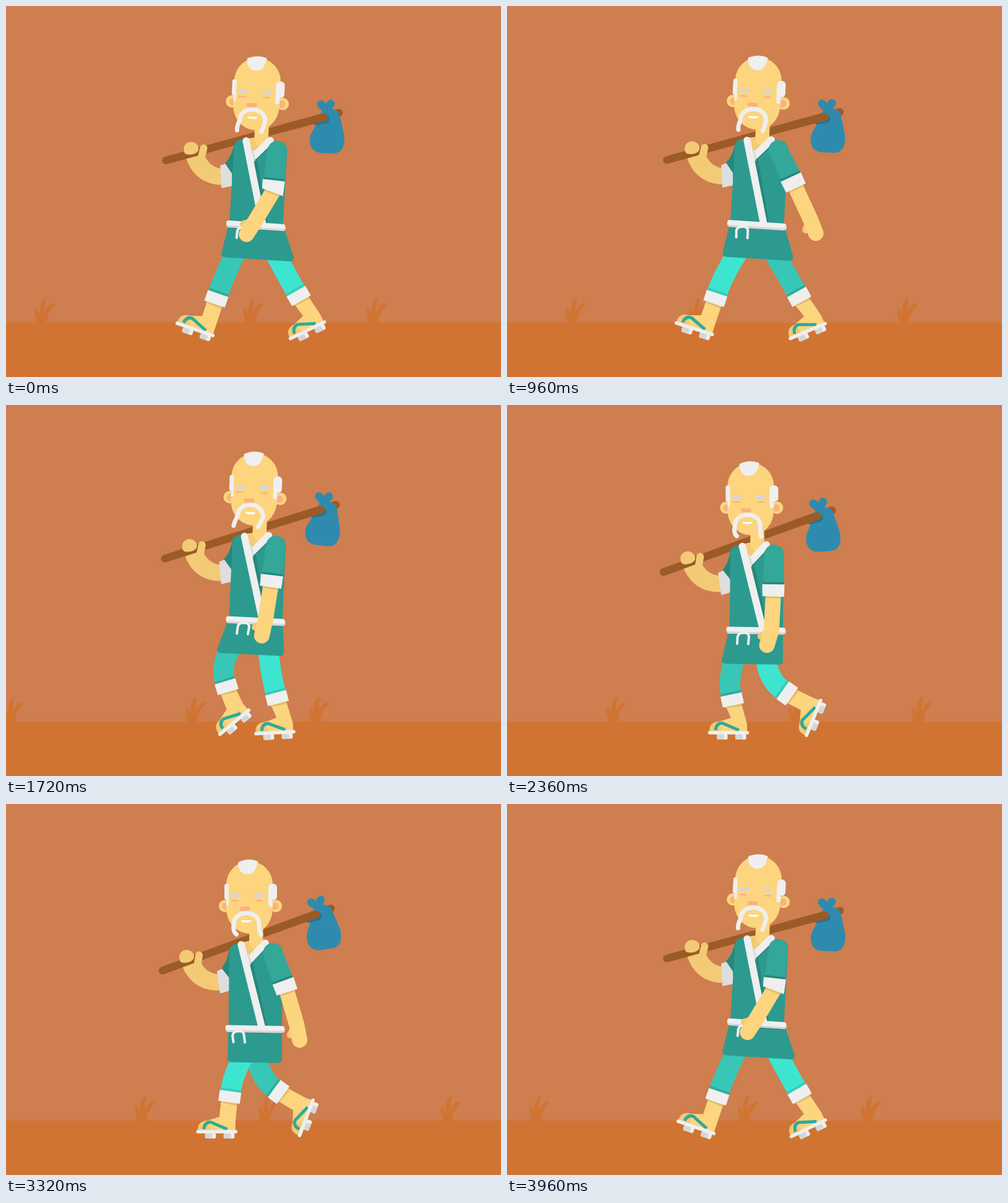
An HTML page with a canvas that plays this animation: 800x600 px, repeating every 4000 ms.

```html
<!DOCTYPE html>
<html lang="en">
<head>
<meta charset="utf-8">
<title>Old traveller walking</title>
<style>
html, body { margin: 0; width: 100%; height: 100%; overflow: hidden; background: #ce7e4f; }
canvas { display: block; }
</style>
</head>
<body>
<canvas id="stage" width="800" height="600"></canvas>
<script>
const ctx = document.getElementById('stage').getContext('2d');
const LOOP = 4000, STEP = 40, CYCLE = 1980, WORLD = 1030;
const RAD = Math.PI / 180;

const SKY = '#ce7e4f', GROUND = '#d17433';
const SKIN = '#fcd57e', SKIN_DARK = '#f3ca75', SKIN_SHADE = '#e3bd6b', BLUSH = '#fbb27c';
const WHITE = '#efefef', GREY = '#d6d6d6';
const TEAL = '#2d9a8f', TEAL_DARK = '#27877c', SLEEVE = '#33a798', STRAP = '#2eaa9b';
const WOOD = '#9b5b27', BAG = '#2e8bae', BAG_DARK = '#23759a';

// ---------- motion ----------

// Cyclic monotone cubic through rows of [time, ...values].
function track(...keys) {
  const n = keys.length;
  const get = (k, c) => keys[(k + n) % n][c] + (c ? 0 : CYCLE * Math.floor(k / n));
  return t => {
    let i = n - 1;
    while (i > 0 && keys[i][0] > t) i--;
    const t0 = get(i, 0), span = get(i + 1, 0) - t0, u = (t - t0) / span;
    return keys[0].slice(1).map((_, j) => {
      const c = j + 1;
      const slope = k => (get(k + 1, c) - get(k, c)) / (get(k + 1, 0) - get(k, 0));
      const tangent = k => {
        const a = slope(k - 1), b = slope(k);
        return a * b > 0 ? 2 * a * b / (a + b) : 0;
      };
      const s = u * u * (3 - 2 * u);
      return get(i, c) * (1 - s) + get(i + 1, c) * s +
        span * u * (1 - u) * ((1 - u) * tangent(i) - u * tangent(i + 1));
    });
  };
}

// x, lean, carrying arm turn
const bodyTrack = track(
  [0, 1.3, 2.85, 2], [380, 0, .1, 0], [640, 0, 1.2, .2],
  [990, 1.3, 2.85, 2], [1320, 0, 0, 0], [1720, .8, 1.9, .9]);
const bobTrack = track(
  [0, -9], [300, 1.5], [380, .5], [640, -15], [690, -15.8], [860, -12.5],
  [990, -9], [1270, .8], [1320, 0], [1670, -15.8], [1720, -15]);
// upper arm, forearm, hand: degrees from straight down
const armTrack = track(
  [0, -6.5, -31, -33], [380, -.8, -3, -17], [640, 12.7, 11.6, -2],
  [990, 25, 25, 22], [1320, 20.7, 17, 12], [1720, -7, -9, -13]);
// left hem, right hem, belt knot, moustache, bag turn
const clothTrack = track(
  [0, 349, 466, 7, -8, 0], [380, 347, 446, 6.5, -1.5, -6.5], [640, 359, 446, 1, -10, 2],
  [990, 349, 464, 4, -7, 0], [1320, 358, 446, 0, 0, -11], [1720, 342, 450, 8, -10.5, 4]);
// hip x, cuff x, cuff y, cuff turn, foot x, foot y, foot turn
const farLegTrack = track(
  [0, 380, 340, 473.5, 19, 305.5, 523, 19], [150, 377, 347, 477, 7, 321, 530, 0],
  [380, 378, 364, 477, -12, 358, 530, 0], [640, 400, 417, 474, -19, 415, 530, 0],
  [990, 420, 473, 470, -30, 487, 525, -26], [1320, 407, 443.5, 466, -54, 486, 507.5, -69.5],
  [1720, 378, 356.5, 455.5, -17, 369, 513, -40]);
const nearLegTrack = track(
  [0, 425, 473, 469, -30, 487, 524.5, -26], [380, 418, 453, 466.5, -55, 495.5, 506, -68],
  [640, 395, 390, 455.5, -27, 416, 511, -53], [990, 385, 336, 474, 19, 301, 523, 19],
  [1140, 387, 342, 477, 15, 311, 530, 0], [1320, 395, 359, 473.5, 9, 337, 530, 0],
  [1720, 422, 438, 474, -15, 434.5, 530, -3]);

// ---------- drawing helpers ----------

function fill(color, d) {
  ctx.fillStyle = color;
  ctx.fill(new Path2D(d));
}

function line(color, width, d, cap = 'round') {
  ctx.strokeStyle = color;
  ctx.lineWidth = width;
  ctx.lineCap = cap;
  ctx.lineJoin = 'round';
  ctx.stroke(new Path2D(d));
}

function dot(color, x, y, r) {
  ctx.fillStyle = color;
  ctx.beginPath();
  ctx.arc(x, y, r, 0, 7);
  ctx.fill();
}

function box(color, x, y, w, h, r) {
  ctx.fillStyle = color;
  ctx.beginPath();
  ctx.roundRect(x, y, w, h, r);
  ctx.fill();
}

function placed(x, y, deg, draw) {
  ctx.save();
  ctx.translate(x, y);
  ctx.rotate(deg * RAD);
  draw();
  ctx.restore();
}

function around(x, y, deg, draw) {
  placed(x, y, deg, () => { ctx.translate(-x, -y); draw(); });
}

function at(x, y, deg, px, py) {
  const c = Math.cos(deg * RAD), s = Math.sin(deg * RAD);
  return [x + px * c - py * s, y + px * s + py * c];
}

// ---------- scene ----------

function plants(t) {
  for (const p of [47, 384, 583, 878]) {
    const x = (p + WORLD * t / LOOP + 50) % WORLD - 50;
    placed(x, 0, 0, () => {
      fill(GROUND, 'M4 513Q-2 498 0 491Q4 487 6 495Q7 503 11 513Z');
      fill(GROUND, 'M8 513C6 496 8 478 14 473Q20 471 17 478C14 488 17 500 15 513Z');
      fill(GROUND, 'M11 513C14 495 20 482 29 481Q34 482 29 487C22 493 20 502 18 513Z');
    });
  }
}

function foot() {
  fill(SKIN_DARK, 'M-31 -2Q-31 -18 -15 -18L-10 -2Z');
  line(STRAP, 5, 'M-21 -4Q-20 -15.5 -10 -15.5L17 -4', 'butt');
  for (const x of [-19, 11]) {
    box(WHITE, x, 2, 17.5, 9, 2.5);
    box(GREY, x, 2, 12, 9, 2.5);
  }
  line(WHITE, 5.5, 'M-30.5 0H30.5');
}

function leg([hip, cx, cy, turn, fx, fy, ft], bob, color, shade) {
  const cuff = (x, y) => at(cx, cy, turn, x, y);
  const sole = (x, y) => at(fx, fy, ft, x, y);
  const shin = [cuff(-13, 5), cuff(13, 5), sole(30, -14), sole(30, -2),
    sole(-18, -2), sole(-15, -18), sole(4, -24)];
  fill(SKIN, 'M' + shin.join('L') + 'Z');
  placed(cx, cy, turn, () => fill(SKIN_SHADE, 'M-13 8H13V13L-13 11Z'));
  placed(fx, fy, ft, foot);
  line(color, 33, `M${hip} ${390 + bob}Q${cuff(0, -46)} ${cuff(0, -8)}`, 'butt');
  placed(cx, cy, turn, () => {
    fill(shade, 'M-16.5 -13H16.5V-7H-16.5Z');
    box(WHITE, -17.5, -9, 35, 18, .5);
  });
}

function bag(turn) {
  placed(506, 176, turn, () => {
    line(BAG, 13, 'M-9.5 -18.5L-1 -10L6.5 -19.5');
    fill(BAG, 'M-11 -2Q-5 -12 5 -11L12 -10Q19 -8 21 0L28 32Q30 60 11 61L-11 60Q-29 57 -27.5 37C-26 26 -17 18 -11 -2Z');
  });
}

function carryingArm(bagTurn) {
  fill(SKIN_DARK, 'M285 263C295 288 315 303 345 302V276C332 275 323 270 316 259L300 256Z');
  line(WOOD, 12.5, 'M253 270L525 169.5');
  fill(SKIN_DARK, 'M280 248C280 241 286 236.5 292 236.5C299 236.5 304 242 304 247C304 254 296 257 288 257.5Q280 258 280 248Z');
  line(SKIN_DARK, 12, 'M312 245L309 264');
  bag(bagTurn);
  line(BAG_DARK, 13, 'M490 186L504 182');
  line(WOOD, 12.5, 'M440 201L501.5 179');
  fill(TEAL_DARK, 'M348 267Q359 254 361 232L372 240V296L360 288Z');
  fill('#dedede', 'M341 271L349 267L361 282L363 302L346 307Z');
}

function torso(hemL, hemR, knot) {
  fill(TEAL, `M359.5 360H446L${hemR} 412Q${hemR + 1} 419.5 ${hemR - 6} 419.3L${hemL + 7} 418Q${hemL - 1.5} 417.5 ${hemL + .5} 410Z`);
  fill(TEAL_DARK, 'M359 366H446.5L447 372L359 370Z');
  fill(TEAL, 'M361 236Q363 226 378 226H430Q447 226 447 242L446 364H359.5Z');
  fill(TEAL_DARK, 'M424 231L399 257L422 360H410L388 250Z');
  fill(SKIN, 'M393 190H415.5V224L394 251L382 224L393 222Z');
  fill(SKIN_DARK, 'M393 222Q394 234 404 236L394 250L384 226Z');
  line(WHITE, 11.5, 'M419 225.5L394 252');
  fill('#dcdcdc', 'M389 240Q396 245 396 259L394 262Z');
  line(WHITE, 11.5, 'M380 228L413 360');
  line(GREY, 10, 'M359.5 364.5L446 366');
  line(WHITE, 8, 'M358.5 362L446 363.5');
  const k = 375 + knot, l = 367.5 + .7 * knot, r = 386 + .6 * knot;
  line(WHITE, 4, `M${l} 385.5L${k - 9} 375Q${k - 8} 368 ${k} 368Q${k + 9} 367 ${k + 9.5} 374L${r} 386`);
}

function head(sway) {
  for (const [x, inner] of [[354, 355.5], [436, 434.5]]) {
    dot(SKIN, x, 165.5, 10);
    dot(BLUSH, inner, 166, 6);
  }
  fill(SKIN, 'M356 130.5A37.5 37.5 0 0 1 431 130.5V168C431 194 414 210 394 210C374 210 356 194 356 168Z');
  fill(BLUSH, 'M431 160.5A6 6 0 0 1 431 172Z');
  box(WHITE, 353, 129.5, 7, 26, 3.5);
  line(WHITE, 4, 'M358 150V163');
  box(WHITE, 424, 129.5, 14, 26.5, 6);
  line(WHITE, 7, 'M427.5 145V163');
  fill(WHITE, 'M375 95Q391 87 407 93C404 107 401 114 389.5 114Q375 113 375 95Z');
  for (const x of [363, 401.5]) box(GREY, x, 145.5, 16, 5.5, 2);
  line(BLUSH, 2.6, 'M365.5 157Q370 156 375 157M405 157Q410 156 414 157');
  box(BLUSH, 377.5, 166.5, 17, 7, 3.5);
  fill('#fff', 'M380 188.5H396.5Q396 192 391 192H385Q381 192 380 188.5Z');
  line(WHITE, 7, `M${372.5 + sway} 211.5Q${366 + sway / 3} 207 368 195C368 171 409 171 409 195Q${409 + sway / 4} 205 ${412 + sway} 212`);
}

function freeArm([upper, fore, hand], lean) {
  const seg = ([x, y], deg, len) => at(x, y, -(deg + lean), 0, len);
  const shoulder = [431, 241];
  const sleeveEnd = seg(shoulder, upper, 50), cuffEnd = seg(shoulder, upper, 68);
  const wrist = seg(cuffEnd, fore, 55), palm = seg(wrist, hand, 25);
  placed(...wrist, -(hand + lean), () => line(SKIN_DARK, 11, 'M-3 2L-13.5 14'));
  line(SKIN, 25, 'M' + [sleeveEnd, cuffEnd, wrist, palm].join('L'));
  placed(...shoulder, -(upper + lean), () => {
    const tilt = (fore - upper) * .6 * RAD, drop = 17.5 * Math.sin(tilt);
    line(SKIN_SHADE, 4, `M-12 ${69 + drop * .7}L12 ${69 - drop * .7}`, 'butt');
    fill(SLEEVE, 'M-15.5 0A15.5 15.5 0 0 1 15.5 0L17 50H-17Z');
    fill(TEAL_DARK, 'M-17 45H17V50H-17Z');
    fill(WHITE, `M-18 48.5H18L17.5 ${68 - drop}L-17.5 ${68 + drop}Z`);
  });
}

function render(t) {
  const p = t % CYCLE;
  const [dx, lean, carry] = bodyTrack(p), [bob] = bobTrack(p);
  const [hemL, hemR, knot, sway, bagTurn] = clothTrack(p);

  ctx.fillStyle = SKY;
  ctx.fillRect(0, 0, 800, 600);
  plants(t);
  ctx.fillStyle = GROUND;
  ctx.fillRect(0, 512, 800, 88);

  leg(farLegTrack(p), bob, '#38c7b6', '#30ac9e');
  leg(nearLegTrack(p), bob, '#3de5d1', '#35cbba');

  ctx.save();
  ctx.translate(dx, bob);
  around(403, 364, lean, () => {
    around(362, 245, carry, () => carryingArm(bagTurn - lean - carry));
    torso(hemL, hemR, knot);
    head(sway);
    freeArm(armTrack(p), lean);
  });
  ctx.restore();
}

const start = performance.now();
function tick() {
  const t = (performance.now() - start) % LOOP;
  render(Math.floor((t + 2) / STEP) * STEP % LOOP);
  requestAnimationFrame(tick);
}
tick();
</script>
</body>
</html>
```
